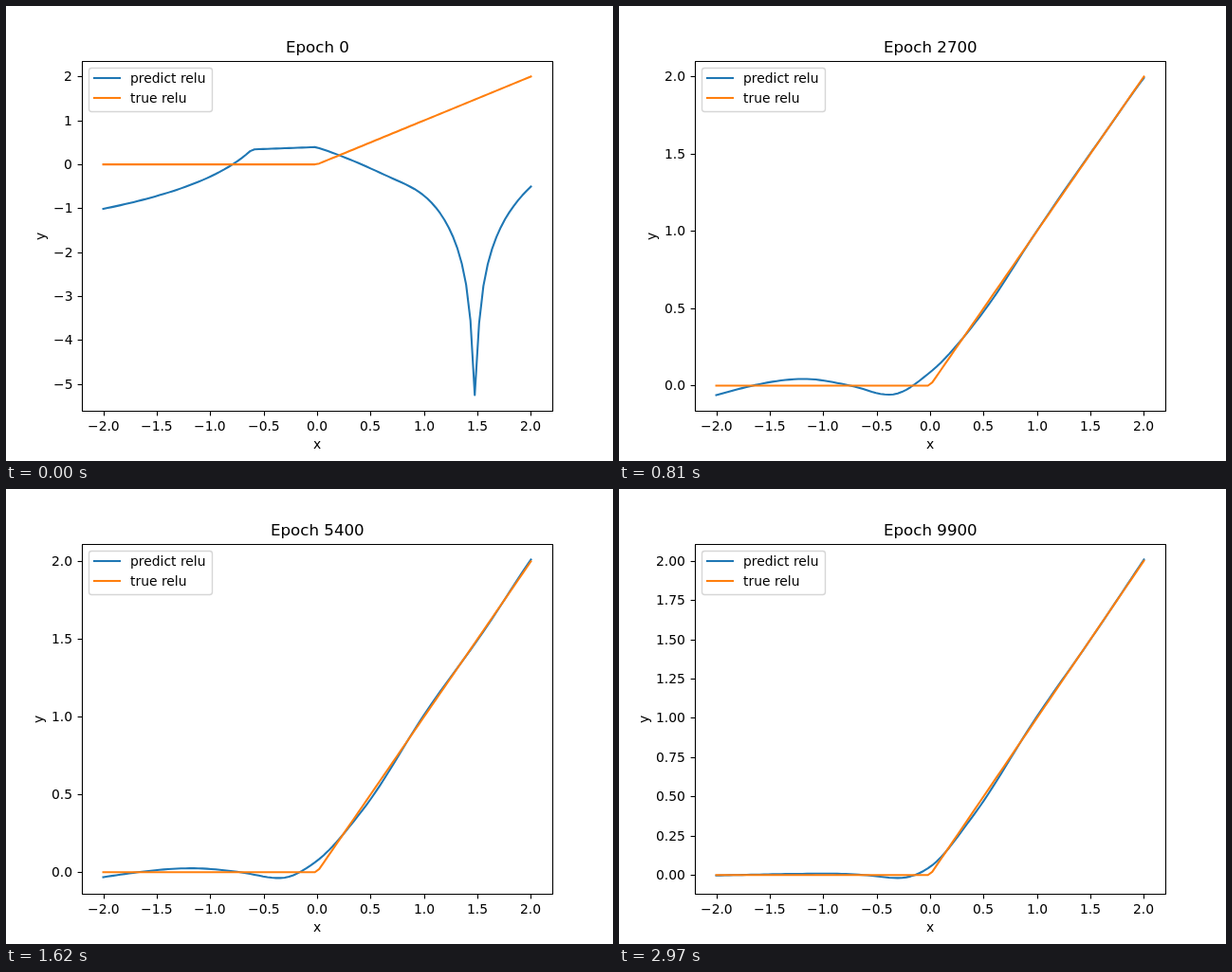
Recreate the animation shown at these times as an HTML page with a canvas. Size 640 px wide and 480 px high, loop 3000 ms.

```html
<!DOCTYPE html>
<html>
<head>
<meta charset="utf-8">
<style>
html, body { margin: 0; width: 640px; height: 480px; overflow: hidden; background: #fff; }
canvas { display: block; }
</style>
</head>
<body>
<canvas id="stage" width="640" height="480"></canvas>
<script>
const g = document.getElementById('stage').getContext('2d');
const BLUE = '#1f77b4', ORANGE = '#ff7f0e';
const xs = Array.from({ length: 100 }, (_, i) => -2 + 4 * i / 99);
const relu = x => Math.max(0, x);

// Hermite curve through [x, error] points added to relu, flat at its turning points
function fit(points) {
  const n = points.length - 1;
  const kx = points.map(p => p[0]), ky = points.map(p => relu(p[0]) + p[1]);
  const h = kx.slice(1).map((x, i) => x - kx[i]);
  const d = h.map((w, i) => (ky[i + 1] - ky[i]) / w);
  const m = kx.map((_, i) => d[i - 1] * d[i] > 0 ? (d[i - 1] * h[i] + d[i] * h[i - 1]) / (h[i - 1] + h[i]) : 0);
  m[0] = (3 * d[0] - m[1]) / 2;
  m[n] = (3 * d[n - 1] - m[n - 1]) / 2;
  return x => {
    let i = 0;
    while (i < n - 1 && x > kx[i + 1]) i++;
    const t = (x - kx[i]) / h[i], u = 1 - t;
    return ky[i] * u + ky[i + 1] * t + t * u * h[i] * ((m[i] - d[i]) * u - (m[i + 1] - d[i]) * t);
  };
}

const early = fit([[-2, -.072], [-1.18, .05], [-.75, 0], [-.39, -.067], [0, .085], [.5, -.012], [1, -.008], [1.5, .016], [2, -.032]]);
const late = fit([[-2, -.003], [-.93, .009], [-.62, 0], [-.3, -.019], [0, .052], [.4, -.025], [1, .01], [1.5, -.001], [2, .008]]);

function untrained(x) {
  if (x >= 0) {
    const y = 1.2 * Math.log(Math.abs(x - 1.476)) + .095 + .175 * Math.tanh(4 * (x - .87));
    return Math.max(-5.25, y);
  }
  const flat = .395 + .09 * x;
  return x < -.5 ? Math.min(flat, -.89 * Math.log(-.22 - x) - .5) : flat;
}

function predict(epoch) {
  if (!epoch) return xs.map(untrained);
  const q = ((9900 - epoch) / 8100) ** 1.5;
  const swell = 5.4 * q ** 1.5 * (1 - q);
  const sag = .075 * Math.exp((100 - epoch) / 200);
  return xs.map(x => {
    const ripple = x > -.25 ? (.01 + .0009 * x ** 4) * Math.cos(2 * Math.PI * x) : 0;
    return late(x) + q * (early(x) - late(x)) + swell * ripple - sag * x * x;
  });
}

const truth = xs.map(relu);
const runs = Array.from({ length: 100 }, (_, i) => predict(i * 100));

const px = x => 328 + x * 496 / 4.4;
const snap = v => Math.floor(v + .5) + .5;
const label = (v, digits) => v.toFixed(digits).replace('-', '\u2212');

// anchor: 0 left, .5 centre, 1 right; text starts on a whole pixel
function text(str, x, y, anchor = .5, size = 13.889) {
  g.font = size + 'px "DejaVu Sans", sans-serif';
  g.fillStyle = '#000';
  const width = g.measureText(str).width;
  g.fillText(str, Math.round(x - anchor * width), Math.round(y));
  return width;
}

function line(points, color, width) {
  g.beginPath();
  points.forEach(p => g.lineTo(...p));
  g.strokeStyle = color;
  g.lineWidth = width;
  g.stroke();
}

function legend() {
  g.beginPath();
  g.roundRect(87.5, 65.5, 130, 46, 2.8);
  g.fillStyle = 'rgba(255,255,255,.8)';
  g.fill();
  g.strokeStyle = 'rgba(204,204,204,.8)';
  g.lineWidth = 1.39;
  g.stroke();
  [['predict relu', BLUE, 76], ['true relu', ORANGE, 97]].forEach(([name, color, y]) => {
    line([[93, y], [120, y]], color, 2.083);
    text(name, 131, y + 5, 0);
  });
}

function draw(step) {
  const ys = runs[step];
  const lo = Math.min(0, ...ys), hi = Math.max(2, ...ys), span = hi - lo;
  const py = y => 410.4 - (y - lo) / span * 336;
  const curve = (data, color) => line(data.map((y, i) => [px(xs[i]), py(y)]), color, 2.083);

  g.fillStyle = '#fff';
  g.fillRect(0, 0, 640, 480);
  g.lineJoin = 'round';

  g.lineCap = 'butt';
  for (let x = -2; x <= 2; x += .5) {
    const X = snap(px(x));
    line([[X, 427.5], [X, 432.4]], '#000', 1.11);
    text(label(x, 1), px(x), 448);
  }

  const gap = [.25, .5, 1].find(s => s >= span * 1.1 / 9);
  const digits = { .25: 2, .5: 1, 1: 0 }[gap];
  let widest = 0;
  for (let k = Math.ceil((lo - span * .05) / gap); k * gap <= hi + span * .05; k++) {
    const y = py(k * gap);
    line([[75.6, snap(y)], [80.5, snap(y)]], '#000', 1.11);
    widest = Math.max(widest, text(label(k * gap, digits), 70.28, y + 5, 1));
  }

  g.lineCap = 'square';
  curve(ys, BLUE);
  curve(truth, ORANGE);
  g.strokeStyle = '#000';
  g.lineWidth = 1.11;
  g.strokeRect(80.5, 58.5, 496, 369);

  text('Epoch ' + step * 100, 328, 49, .5, 16.667);
  text('x', 328, 467);
  g.save();
  g.translate(Math.round(61.4 - widest), 243);
  g.rotate(-Math.PI / 2);
  text('y', 0, 0);
  g.restore();
  legend();
}

function tick() {
  draw(Math.floor(performance.now() / 30) % 100);
  requestAnimationFrame(tick);
}
tick();
</script>
</body>
</html>
```
